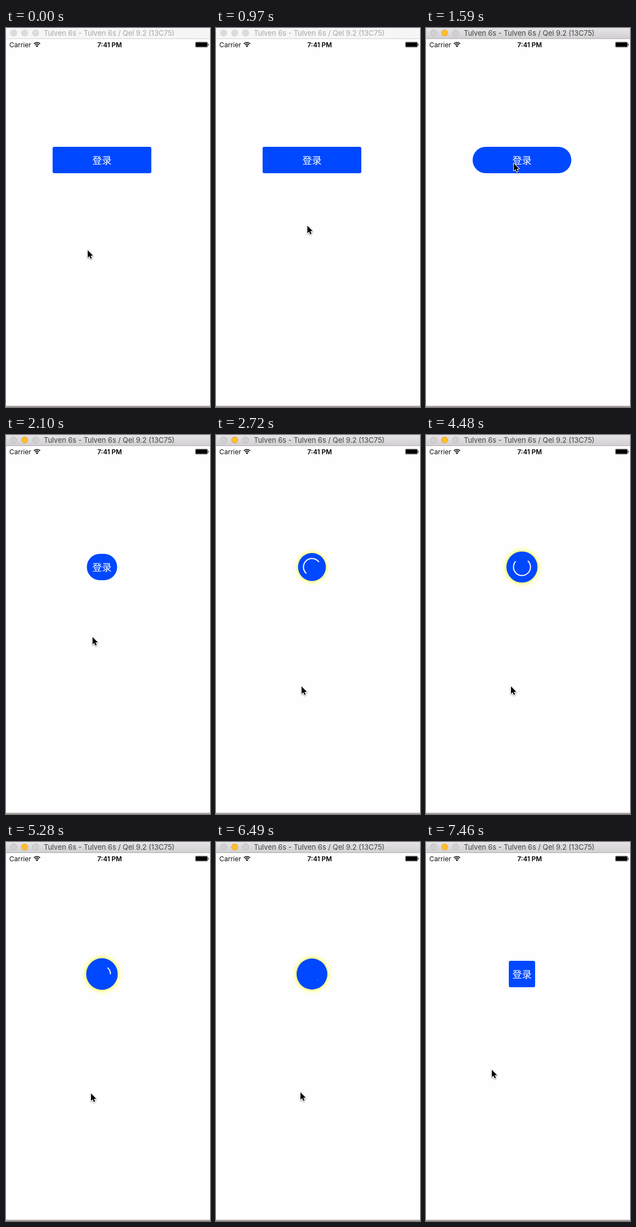
These frames come from a looping animation (372 px wide and 689 px high, 8000 ms). An HTML page with a canvas:

```html
<!DOCTYPE html>
<html lang="zh-CN">
<head>
<meta charset="utf-8">
<title>Login button</title>
<style>
html, body { margin: 0; width: 100%; height: 100%; overflow: hidden; background: #fefefe; }
canvas { display: block; width: 372px; height: 689px; }
</style>
</head>
<body>
<canvas id="stage"></canvas>
<script>
const W = 372, H = 689, LOOP = 8000, STEP = 87.5;
const PRESS = 1590, SPIN = 2100, DONE = 7280;
const CX = 175, CY = 240, BLUE = '#0048ff', TAU = Math.PI * 2;
const canvas = document.getElementById('stage');
const ctx = canvas.getContext('2d');
const dpr = window.devicePixelRatio || 1;
canvas.width = W * dpr;
canvas.height = H * dpr;
ctx.scale(dpr, dpr);

const clamp = v => Math.max(0, Math.min(1, v));
const ease = u => { u = clamp(u); return u * u * (3 - 2 * u); };

// Cursor tip: time, x, y
const path = [
  [0, 149, 404], [80, 149, 404], [170, 148.5, 404.5], [440, 148.5, 404.5], [620, 148.5, 405],
  [790, 149, 404], [970, 166, 362], [1150, 181, 300], [1290, 172, 260], [1410, 160, 246],
  [1680, 160, 246], [2000, 158, 360], [2370, 156, 457], [3700, 156, 457], [4130, 155, 457],
  [5990, 155, 457], [6400, 154, 455], [6840, 154, 455], [7150, 134, 431], [7400, 120, 414], [LOOP, 120, 414]
];

function cursorAt(t) {
  const i = Math.max(1, path.findIndex(p => p[0] >= t));
  const [t0, x0, y0] = path[i - 1], [t1, x1, y1] = path[i];
  const k = clamp((t - t0) / (t1 - t0));
  return [x0 + (x1 - x0) * k, y0 + (y1 - y0) * k];
}

function text(str, x, y, font, color, align = 'left') {
  ctx.font = font;
  ctx.fillStyle = color;
  ctx.textAlign = align;
  ctx.fillText(str, x, y);
}

function rect(x, y, w, h, color, r = 0) {
  ctx.fillStyle = color;
  ctx.beginPath();
  ctx.roundRect(x, y, w, h, r);
  ctx.fill();
}

function arc(x, y, r, from, to, color, width) {
  ctx.beginPath();
  ctx.arc(x, y, r, from, to);
  ctx.strokeStyle = color;
  ctx.lineWidth = width;
  ctx.stroke();
}

function disc(x, y, r, color) {
  ctx.beginPath();
  ctx.arc(x, y, r, 0, TAU);
  ctx.fillStyle = color;
  ctx.fill();
}

function titleBar(active) {
  const bg = ctx.createLinearGradient(0, 0, 0, 20);
  bg.addColorStop(0, active ? '#e6e4e6' : '#f6f6f6');
  bg.addColorStop(1, active ? '#d0ced0' : '#f6f6f6');
  rect(0, 0, W, 20, bg);
  rect(0, 19, W, 1, active ? '#b0aeb0' : '#d2d2d2');
  [14, 34, 54].forEach((x, i) => {
    const lit = active && i === 1;
    disc(x, 9, 6, lit ? '#fdbe30' : active ? '#d2d0d2' : '#dcdcdc');
    arc(x, 9, 5.6, 0, TAU, lit ? '#e2a32a' : active ? '#b9b7b9' : '#cecece', 0.8);
  });
  text('Tulven 6s - Tulven 6s / Qel 9.2 (13C75)', 69, 14, '13px Inter, sans-serif', active ? '#444' : '#a6a6a6');
}

function statusBar() {
  text('Carrier', 6, 35, '12.2px Inter, sans-serif', '#111');
  text('7:41 PM', 189, 35, '600 12px Inter, sans-serif', '#000', 'center');
  const mid = -Math.PI / 2;
  [[8.2, 1.7], [5.2, 1.7]].forEach(([r, w]) => arc(56.5, 34.5, r, mid - 0.78, mid + 0.78, '#111', w));
  ctx.beginPath();
  ctx.moveTo(56.5, 35);
  ctx.arc(56.5, 35, 3.2, mid - 0.78, mid + 0.78);
  ctx.fillStyle = '#111';
  ctx.fill();
  ctx.strokeStyle = '#555';
  ctx.lineWidth = 0.7;
  ctx.beginPath();
  ctx.roundRect(345.3, 25.5, 22.4, 9.5, 1.5);
  ctx.stroke();
  rect(346, 26.2, 21, 8.1, '#000', 0.8);
  rect(368.3, 28.5, 1.3, 3.5, '#222', 0.6);
}

function button(width, radius) {
  rect(CX - width / 2, CY - 24, width, 48, BLUE, radius);
  text('登录', CX, CY + 6.7, '300 17.5px "Noto Sans CJK SC", "Noto Sans CJK", sans-serif', '#fff', 'center');
}

function spinner(ms) {
  const r = 24 + 4.8 * Math.sin(ms * 0.00048);
  ctx.save();
  ctx.shadowColor = '#ff0';
  ctx.shadowBlur = 0.36 * r * dpr;
  disc(CX, CY, r, BLUE);
  ctx.restore();
  // The arc grows for two thirds of a cycle, then its tail catches up
  const p = ms % 1450 / 1450;
  const grow = ease(p * 1.5), shrink = ease(p * 3 - 2);
  const turn = 0.175 + ms / 4000 * TAU;
  arc(CX, CY, 15.5, turn + TAU * (0.25 * grow + 0.75 * shrink), turn + TAU * grow, '#fff', 2);
}

function cursor([x, y]) {
  ctx.save();
  ctx.translate(x, y);
  ctx.beginPath();
  [[0, 0], [0, 13.6], [3.1, 10.8], [5.3, 15.6], [7.5, 14.6], [5.3, 9.9], [9.6, 9.7]].forEach(p => ctx.lineTo(...p));
  ctx.closePath();
  ctx.lineJoin = 'round';
  ctx.lineWidth = 2;
  ctx.strokeStyle = '#fff';
  ctx.shadowColor = 'rgba(0,0,0,.45)';
  ctx.shadowBlur = 2.5 * dpr;
  ctx.shadowOffsetY = dpr;
  ctx.stroke();
  ctx.shadowColor = 'transparent';
  ctx.fillStyle = '#000';
  ctx.fill();
  ctx.restore();
}

function draw(now) {
  // The screen refreshes in even steps
  const t = Math.max(0, PRESS + Math.floor((now % LOOP - PRESS + 8) / STEP) * STEP);
  rect(0, 0, W, H, '#fefefe');
  titleBar(t >= PRESS);
  statusBar();
  rect(0, 687, W, 1, '#82746f');
  rect(0, 688, W, 1, '#cfc4bd');
  if (t < PRESS) button(180, 3);
  else if (t < SPIN) button(180 - 132 * ease((t - PRESS) / (SPIN - PRESS)), 24);
  else if (t < DONE) spinner(t - SPIN);
  else button(48, 3);
  cursor(cursorAt(t));
}

const start = performance.now();
function tick() {
  draw(performance.now() - start);
  requestAnimationFrame(tick);
}
tick();
</script>
</body>
</html>
```
